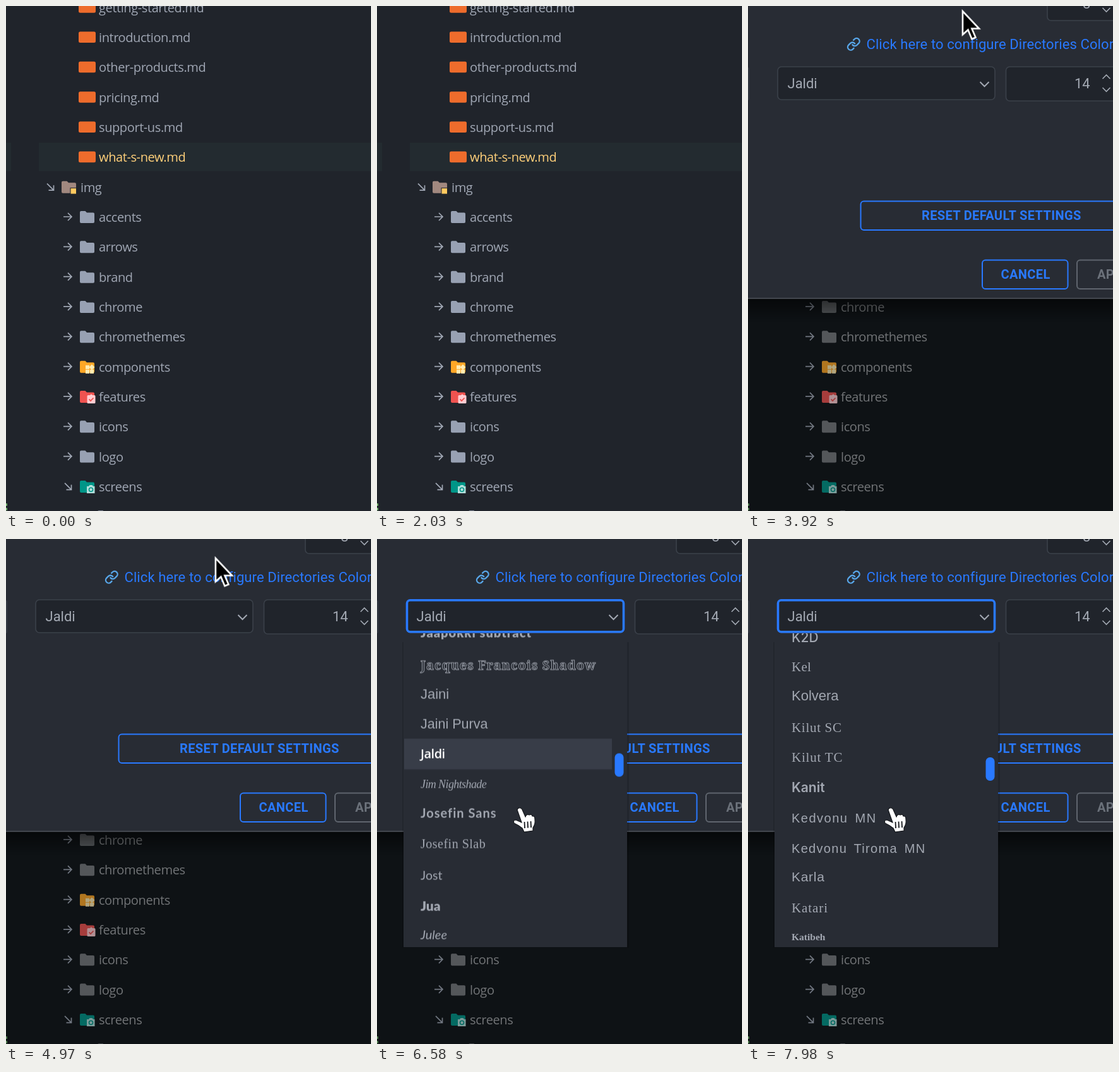
An HTML page that plays this animation: 578 by 798 pixels, repeating every 8 s.

```html
<!DOCTYPE html>
<html lang="en">
<head>
<meta charset="utf-8">
<title>Font picker in a settings dialog</title>
<style>
html, body { margin: 0; width: 100%; height: 100%; overflow: hidden; background: #20242b; }
svg { display: block; width: 100vw; height: 100vh; }
text { white-space: pre; }

.bg, .row, .tree, .plain, .name, .dialog, .popup, .move, .arrow, .hand, .ring, .list, .thumb {
  animation: 8s linear infinite;
}
.bg { animation-name: bg; }
.row { animation-name: row; }
.tree { animation-name: tree; }
.plain { animation-name: plain; }
.name { animation-name: name; }
.dialog { animation-name: dialog; animation-timing-function: step-end; }
.popup { animation-name: popup; animation-timing-function: step-end; }
.move { animation-name: move; }
.arrow { animation-name: arrow; animation-timing-function: step-end; }
.hand { animation-name: hand; animation-timing-function: step-end; }
.ring { animation-name: ring; }
.list { animation-name: list; }
.thumb { animation-name: thumb; }

@keyframes bg { 0%, 26.25% { fill: #20242b } 29%, 100% { fill: #0e1215 } }
@keyframes row { 0%, 26.25% { fill: #232b30 } 29%, 100% { fill: #111619 } }
@keyframes tree { 0%, 26.25% { opacity: 1 } 29%, 100% { opacity: .68 } }
@keyframes plain { 0%, 26.25% { fill: #98a1b3 } 29%, 100% { fill: #77797d } }
@keyframes name { 0%, 26.25% { fill: #a0a7b4 } 29%, 100% { fill: #a1a3a5 } }
@keyframes dialog { 0% { opacity: 0 } 39.375%, 100% { opacity: 1 } }
@keyframes popup { 0% { opacity: 0 } 74.375%, 100% { opacity: 1 } }
@keyframes arrow { 0% { opacity: 1 } 77.25%, 100% { opacity: 0 } }
@keyframes hand { 0% { opacity: 0 } 77.25%, 100% { opacity: 1 } }
@keyframes move {
  0%, 46.25% { transform: translate(345px, -60px); animation-timing-function: ease-out }
  48.75% { transform: translate(340px, 8px) }
  58.75% { transform: translate(336px, 14px); animation-timing-function: ease-in }
  62.125% { transform: translate(332px, 30px); animation-timing-function: ease-out }
  70%, 74.4% { transform: translate(285px, 118px) }
  76.125% { transform: translate(289px, 118px); animation-timing-function: ease-in-out }
  80.5%, 100% { transform: translate(226px, 426px) }
}
@keyframes ring {
  0%, 73.4% { transform: scale(.3); opacity: 0 }
  73.5% { transform: scale(.3); opacity: .8 }
  76.125% { transform: scale(1); opacity: .34 }
  78.75%, 100% { transform: scale(1.15); opacity: 0 }
}
@keyframes list {
  0%, 79.6% { transform: translateY(0); animation-timing-function: cubic-bezier(.35, .1, .7, .75) }
  88.375% { transform: translateY(-343px) }
  99.75%, 100% { transform: translateY(-823px) }
}
@keyframes thumb {
  0%, 79.6% { transform: translateY(0) }
  88.375% { transform: translateY(2px) }
  99.75%, 100% { transform: translateY(7px) }
}

.tree text { font: 20px "Open Sans", "Noto Sans", sans-serif; letter-spacing: -.4px; }
.open { fill: #ffd07a; }
.line { fill: none; stroke: #a0a7b4; stroke-width: 1.7; }
.ui { font: 22px Roboto, sans-serif; fill: #a3a9b3; }
.link { fill: #2979ff; letter-spacing: .1px; }
.btn { font: 700 20px Roboto, sans-serif; fill: #2979ff; letter-spacing: .37px; }
.field { fill: #20242b; stroke: #3b414a; stroke-width: 1.6; }
.box { fill: none; stroke: #2979ff; stroke-width: 2; }
.off { stroke: #5f656e; }
.spin { fill: none; stroke: #a3a9b3; stroke-width: 1.6; }
.list text { fill: #a3a8b2; }
</style>
</head>
<body>
<svg viewBox="0 0 578 798">
  <defs>
    <clipPath id="view"><rect x="42" y="149" width="354" height="496"/></clipPath>
    <linearGradient id="fade" x2="0" y2="1">
      <stop stop-color="#000" stop-opacity=".5"/>
      <stop offset="1" stop-color="#000" stop-opacity="0"/>
    </linearGradient>
    <path id="folder" d="M2 0H8.5L11 2.6H21Q23 2.6 23 4.6V17Q23 19 21 19H2Q0 19 0 17V2Q0 0 2 0Z"/>
  </defs>

  <rect class="bg" width="578" height="798"/>
  <path class="row" d="M0 216H8V261H0ZM52 216H578V261H52Z"/>
  <g class="tree" id="tree">
    <path d="M0 786h2v4h-2zM0 793h2v4h-2z" fill="#6fae6a"/>
  </g>

  <g class="dialog">
    <rect y="463" width="578" height="36" fill="url(#fade)"/>
    <rect width="578" height="462" fill="#282c34"/>
    <path d="M0 462H578" stroke="#50555d" stroke-width="1.6"/>
    <rect class="field" x="474" y="-30" width="140" height="53" rx="6"/>
    <text class="ui" x="530" y="4">8</text>
    <g fill="none" stroke="#58a6e8" stroke-width="2.5" stroke-linecap="round" transform="translate(156 49) scale(.94)">
      <path d="M10 13a5 5 0 0 0 7.54 .54l3-3a5 5 0 0 0-7.07-7.07l-1.72 1.71"/>
      <path d="M14 11a5 5 0 0 0-7.54-.54l-3 3a5 5 0 0 0 7.07 7.07l1.71-1.71"/>
    </g>
    <text class="ui link" x="187.5" y="67.5">Click here to configure Directories Colors</text>
    <rect class="field" x="-40" y="97" width="41" height="52" rx="3"/>
    <rect class="field" x="47" y="96" width="344" height="52" rx="6"/>
    <text class="ui" x="62.5" y="130">Jaldi</text>
    <path class="spin" d="M367.5 120l7 7l7 -7" style="stroke-width:2"/>
    <rect class="field" x="408.5" y="96" width="200" height="54" rx="6"/>
    <text class="ui" x="517" y="130">14</text>
    <path class="spin" d="M561.5 3l6 6l6 -6M561.5 115l6 -6l6 6M561.5 129l6 6l6 -6"/>
    <rect class="box" x="178.5" y="308.5" width="440" height="45.5" rx="5"/>
    <text class="btn" x="275" y="338">RESET DEFAULT SETTINGS</text>
    <rect class="box" x="371" y="401.5" width="135.5" height="45.5" rx="5"/>
    <text class="btn" x="400.5" y="431">CANCEL</text>
    <rect class="box off" x="521" y="401.5" width="110" height="45.5" rx="5"/>
    <text class="btn" x="553" y="431" style="fill:#6b717a">APPLY</text>
  </g>

  <g class="popup">
    <rect x="40" y="163" width="359" height="483" fill="#000" opacity=".13"/>
    <rect x="42" y="149" width="354" height="496" fill="#282c34"/>
    <g clip-path="url(#view)">
      <g class="list" id="list"><rect x="43" y="385" width="329" height="48.5" fill="#383d48"/></g>
    </g>
    <rect class="thumb" x="376.5" y="338" width="14" height="37" rx="6.5" fill="#2979ff"/>
    <rect class="box" x="47.5" y="96.7" width="343" height="50" rx="5" style="stroke-width:3.6"/>
  </g>

  <g transform="translate(285.5 118)">
    <circle class="ring" r="33" fill="none" stroke="#f04a4a" stroke-width="4"/>
  </g>
  <g class="move">
    <path class="arrow" d="M0 0V37L8.5 29.5L14.5 44L20.5 41.5L14.5 27.500H26Z" fill="#000" stroke="#fff" stroke-width="2.6"/>
    <g class="hand">
      <path d="M-4 2Q-3 -2 1 -1Q4 0 5 4L9 13Q11 8 15 10Q19 8 20 12Q24 11 24 17Q25 25 21 30V35L7 37L4 31Q-2 26 -9 23Q-11 18 -6 18L3 22Z" fill="#fff" stroke="#14171b" stroke-width="1.2"/>
      <path d="M7.5 21L8 31M12.5 20.5L13 30.5M17.5 20L18 30" stroke="#14171b" stroke-width="1.8"/>
    </g>
  </g>
</svg>

<script>
const PITCH = 47.33;
const add = (id, html) => document.getElementById(id).insertAdjacentHTML('beforeend', html);
const folder = (x, y, color) =>
  `<use href="#folder" x="${x}" y="${y - 10}" ${color ? `fill="${color}"` : 'class="plain"'}/>`;
const label = (x, y, name, cls = 'name') => `<text x="${x}" y="${y + 7}" class="${cls}">${name}</text>`;
const closed = y => `<path class="line" d="M91 ${y - 1}h13m-6 -6l6 6l-6 6"/>`;
const opened = (x, y) => `<path class="line" d="M${x} ${y - 6}l10.5 10.5m-8 0h8v-8"/>`;

// Folder colour, badge colour and badge shape
const badges = {
  components: ['#ffa726', '#ffecb3', 'M9 7h6v6h-6zM9 14h6v6h-6zM16 14h6v6h-6zM19 5.5l4.5 4.5l-4.5 4.5l-4.5 -4.5z'],
  features: ['#ef5350', '#ffcdd2', 'M13 7h3q2 -3 4 0h3q1.5 0 1.5 1.5v10q0 1.5 -1.5 1.5h-10q-1.5 0 -1.5 -1.5v-10q0 -1.5 1.5 -1.5z'],
  screens: ['#009688', '#b2dfdb', 'M11 9h3l1.5 -2h4l1.5 2h2.5v11h-12.5z']
};
const detail = {
  features: '<path d="M14.5 13.5l2.5 2.5l4.5 -4.5" fill="none" stroke="#ef5350" stroke-width="1.7"/>',
  screens: '<circle cx="17.5" cy="14.3" r="3" fill="none" stroke="#009688" stroke-width="1.6"/>'
};

const files = ['getting-started', 'introduction', 'other-products', 'pricing', 'support-us', 'what-s-new'];
const dirs = ['accents', 'arrows', 'brand', 'chrome', 'chromethemes', 'components', 'features', 'icons', 'logo', 'screens'];
const rowY = i => 50 + (i - 1) * PITCH;

files.forEach((name, i) => {
  const y = rowY(i);
  add('tree', `<rect x="115" y="${y - 9.5}" width="27" height="17.5" rx="2.5" fill="#ee6c2c"/>` +
    label(147, y, name + '.md', i === 5 ? 'open' : 'name'));
});

const imgY = rowY(6);
add('tree', opened(65, imgY) + folder(88, imgY, '#a1887f') +
  `<rect x="102" y="${imgY + 1}" width="9.5" height="9.5" fill="#ffca5f" stroke="#20242b"/>` + label(118, imgY, 'img'));

dirs.forEach((name, i) => {
  const y = rowY(7 + i), b = badges[name];
  add('tree', (name === 'screens' ? opened(93, y) : closed(y)) + folder(117, y, b && b[0]) +
    (b ? `<g transform="translate(117 ${y - 10})"><path d="${b[2]}" fill="${b[1]}"/>${detail[name] || ''}</g>` : '') +
    label(147, y, name));
});
add('tree', folder(145, rowY(17)));

const LATO = 'Lato, sans-serif', SANS = '"Liberation Sans", sans-serif';
const SERIF = '"Liberation Serif", serif', INTER = 'Inter, sans-serif';

// name, centre y, font shorthand, letter spacing, extra style
const fonts = [
  ['Jaapokki enchance', 171, `900 20px ${LATO}`, 1],
  ['Jaapokki subtract', 218, `900 20px ${LATO}`, 1],
  ['Jacques Francois Shadow', 269, '700 20px "Noto Serif", serif', 1, 'fill:#282c34;stroke:#a3a8b2;stroke-width:.9'],
  ['Jaini', 315, `22px ${SANS}`, 0],
  ['Jaini Purva', 362, `21.5px ${SANS}`, 0],
  ['Jaldi', 409, '600 20px "Open Sans", sans-serif', -.5, 'fill:#fff'],
  ['Jim Nightshade', 456, `italic 18px ${SERIF}`, -.6],
  ['Josefin Sans', 503, `700 20px ${LATO}`, 1],
  ['Josefin Slab', 551, `20px ${SERIF}`, .5],
  ['Jost', 601, `19.5px ${LATO}`, 0],
  ['Jua', 650, `900 21px ${LATO}`, 0],
  ['Julee', 695, `italic 20px ${LATO}`, 0],
  ['Julius Sans One', 742, `small-caps 300 23px ${LATO}`, 2.6],
  ['Junction', 786, `22px ${LATO}`, 0],
  ['Jura', 838, `300 20px ${INTER}`, 1],
  ['Just Another Hand', 882, `italic 700 16px ${LATO}`, -1.7],
  ['Just Me Again Down Here', 932, `italic 15px ${LATO}`, 0, 'word-spacing:3px'],
  ['K2D', 979, `500 21px ${INTER}`, 0],
  ['Kel', 1025, `21px ${SERIF}`, .3],
  ['Kolvera', 1071, `22px ${SANS}`, 0],
  ['Kilut SC', 1121, `21px ${SERIF}`, .7],
  ['Kilut TC', 1168, `21px ${SERIF}`, .8],
  ['Kanit', 1216, `600 21px ${INTER}`, 0],
  ['Kedvonu MN', 1264, `20px ${SANS}`, 1.5, 'word-spacing:4px'],
  ['Kedvonu Tiroma MN', 1312, `20px ${SANS}`, 1.3, 'word-spacing:4px'],
  ['Karla', 1357, `21px ${SANS}`, .7],
  ['Katari', 1406, `21px ${SERIF}`, .9],
  ['Katibeh', 1450, `700 15.5px ${SERIF}`, 0]
];
fonts.forEach(([name, y, font, gap, extra = '']) =>
  add('list', `<text x="69" y="${y + 7}" style='font:${font};letter-spacing:${gap}px;${extra}'>${name}</text>`));
</script>
</body>
</html>
```
